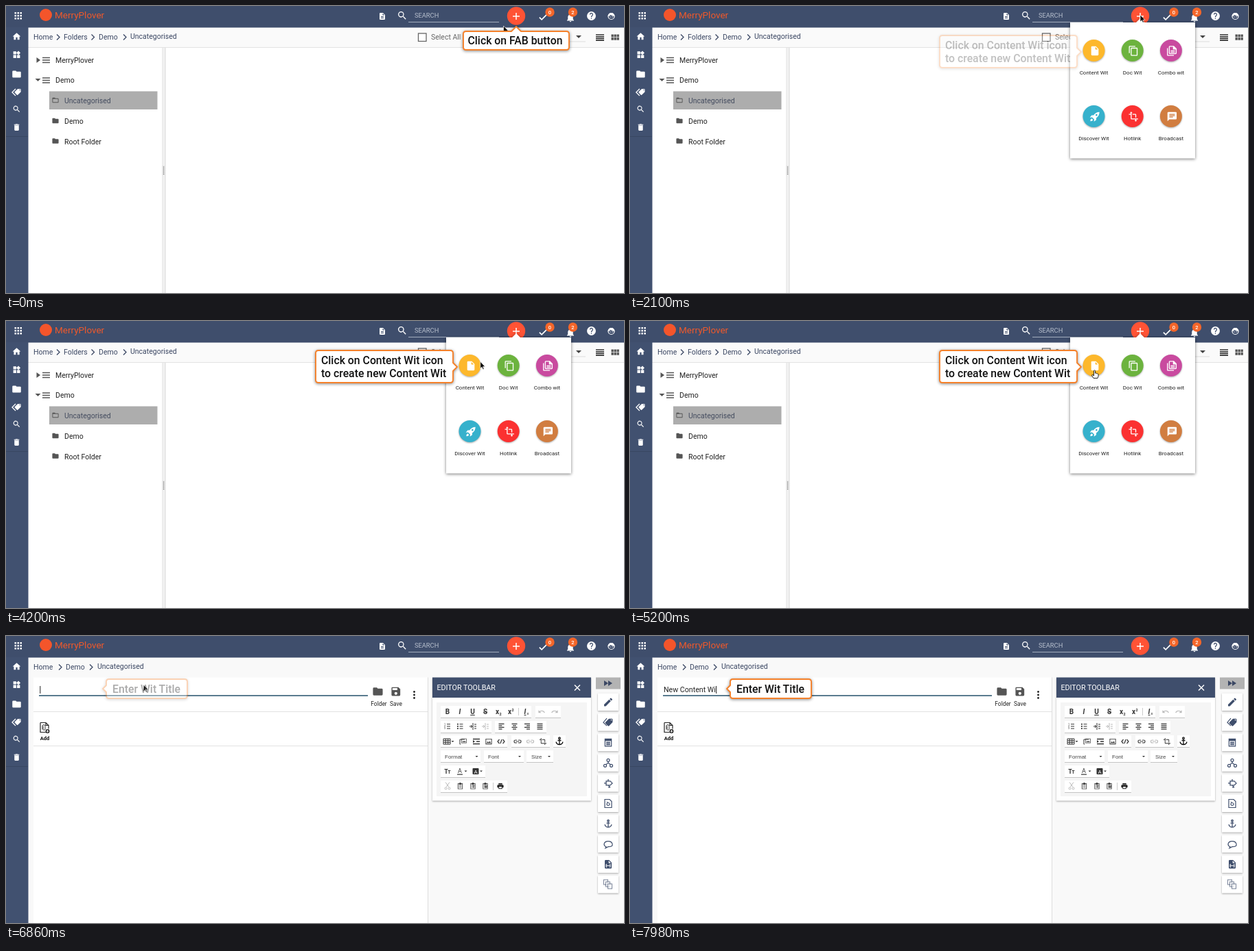
Write an HTML page that moves like this. It is 900 px wide and 419 px high and loops after 8000 ms.

```html
<!DOCTYPE html>
<html lang="en">
<head>
<meta charset="utf-8">
<title>Creating a content item</title>
<style>
html, body { margin: 0; width: 100%; height: 100%; overflow: hidden; background: #fff; }
svg { display: block; width: 100vw; height: 100vh; }
text { font: 10.5px Roboto, sans-serif; white-space: pre; }
.callout text { font-size: 15.8px; font-weight: 500; }
.callout path { fill: #fff; stroke: #f5812a; stroke-width: 1.9; }
.callout { filter: drop-shadow(0 1px 2px #0007); }
#panel { filter: drop-shadow(0 1px 2px #0008); }
.card { filter: drop-shadow(0 1px 1px #0005); }
</style>
</head>
<body>
<svg id="stage" viewBox="0 0 900 419"></svg>
<script>
const NAVY = '#3f4e6c', INK = '#3b4763', GREY = '#666', PALE = '#bbb', DARK = '#333';
const BRAND = 'MerryPlover', TITLE = 'New Content Wit', LOOP = 8000;

// 24-unit icon outlines
const ICON = {
  home: 'M10 20v-6h4v6h5v-8h3L12 3 2 12h3v8z',
  widgets: 'M13 13v8h8v-8zM3 21h8v-8H3zM3 3v8h8V3zM16.7 1.7L11 7.3l5.7 5.7 5.6-5.7z',
  folder: 'M10 4H4Q2 4 2 6V18q0 2 2 2H20q2 0 2-2V8q0-2-2-2H12z',
  folderOpen: 'M10 4H4Q2 4 2 6V18q0 2 2 2H20q2 0 2-2V8q0-2-2-2H12zM4 8H20V18H4z',
  search: 'M15.5 14h-.8l-.3-.3A6.5 6.5 0 1 0 13.7 14.4l.3.3v.8l5 5 1.5-1.5zM9.5 14a4.5 4.5 0 1 1 0-9 4.5 4.5 0 0 1 0 9z',
  trash: 'M6 19q0 2 2 2h8q2 0 2-2V7H6zM19 4h-3.5l-1-1h-5l-1 1H5v2h14z',
  tag: 'M21.4 11.6l-9-9Q12 2 11 2H4Q2 2 2 4v7q0 1 .6 1.4l9 9q1.4 1.2 2.8 0l7-7q1.2-1.4 0-2.8zM5.5 7a1.5 1.5 0 1 1 0-3 1.5 1.5 0 0 1 0 3z',
  page: 'M6 2Q4 2 4 4V20q0 2 2 2H18q2 0 2-2V8L14 2zM13 9V3.5L18.5 9z',
  pageText: 'M6 2Q4 2 4 4V20q0 2 2 2H18q2 0 2-2V8L14 2zM13 9V3.5L18.5 9zM8 12h8v2H8zM8 16h8v2H8z',
  check: 'M9 16.2L4.8 12l-2 2L9 20 21.6 7.4l-2-2z',
  bell: 'M12 22q2 0 2-2h-4q0 2 2 2zM18 16v-5q0-5-4.5-6.3V4a1.5 1.5 0 0 0-3 0v.7Q6 6 6 11v5l-2 2v1h16v-1z',
  help: 'M12 2a10 10 0 1 0 0 20 10 10 0 0 0 0-20zM11 17h2v2h-2zM15 11.3l-.9.9Q13 13.2 13 15h-2q0-2 1.2-3.3l1.2-1.3A2 2 0 1 0 10 9H8a4 4 0 1 1 7 2.3z',
  copy: 'M16 1H4Q2 1 2 3v14h2V3h12zM19 5H8Q6 5 6 7v14q0 2 2 2h11q2 0 2-2V7q0-2-2-2zM19 21H8V7h11z',
  combo: 'M3 6H1v15q0 2 2 2h13v-2H3zM8 1Q5 1 5 3v14q0 2 2 2h13q2 0 2-2V7l-6-6zM7 3h7v6h6v8H7zM9 11h9v1.6H9zM9 14h9v1.6H9z',
  rocket: 'M22 2Q14 2 9 9H5l-4 5 5-.5 4.500 4.500-.5 5 5-4v-4Q22 10 22 2zM15.500 6.500a2 2 0 1 1 0 4 2 2 0 0 1 0-4zM5 16q-3 1-3 6 5 0 6-3z',
  transform: 'M22 18v-2H8V4h2L7 1 4 4h2v2H2v2h4v8q0 2 2 2h8v2h-2l3 3 3-3h-2v-2zM10 8h6v6h2V8q0-2-2-2h-6z',
  crop: 'M17 15h2V7q0-2-2-2H9v2h8zM7 17V1H5v4H1v2h4v10q0 2 2 2h10v4h2v-4h4v-2z',
  chat: 'M20 2H4Q2 2 2 4V22l4-4H20q2 0 2-2V4q0-2-2-2zM6 6h12v2H6zM6 9h12v2H6zM6 12h8v2H6z',
  save: 'M17 3H5Q3 3 3 5v14q0 2 2 2h14q2 0 2-2V7zM12 19a3 3 0 1 1 0-6 3 3 0 0 1 0 6zM15 9H5V5h10z',
  edit: 'M3 17.200V21h3.800L17.800 9.900 14 6.200zM20.700 7q.8-.7 0-1.400l-2.300-2.300q-.7-.7-1.400 0l-1.900 1.800 3.800 3.800z',
  undo: 'M12.500 8Q8.500 8 5.600 10.600L2 7v9h9l-3.600-3.600q2-1.900 5.100-1.900 5.500 0 7.600 5.500l2.400-.8Q20 8 12.500 8z',
  print: 'M19 8H5q-3 0-3 3v6h4v4h12v-4h4v-6q0-3-3-3zM16 19H8v-5h8zM18 3H6v4h12z',
  image: 'M2 3h20v18H2zM4 5v14h16V5zM5 17l4-5 3 3 3-4 4 6z',
  paste: 'M4 3h4q4-4 8 0h4v19H4zM6 5v15h12V5h-2v3H8V5zM8 11h8v1.800H8zM8 15h8v1.800H8z',
  form: 'M3 2h18v20H3zM5 8v12h14V8zM7 10h10v2H7zM7 13h10v2H7zM7 16h10v2H7z'
};

const icon = (name, x, y, size, fill = '#fff', turn = '') =>
  `<path d="${ICON[name]}" fill="${fill}" fill-rule="evenodd" transform="translate(${x} ${y}) ${turn} scale(${size / 24}) translate(-12 -12)"/>`;
const stroke = (d, x, y, color = DARK, width = 1) =>
  `<path d="${d}" fill="none" stroke="${color}" stroke-width="${width}" transform="translate(${x} ${y})"/>`;
const shape = (d, fill, x = 0, y = 0) => `<path d="${d}" fill="${fill}" transform="translate(${x} ${y})"/>`;
const rect = (x, y, w, h, fill, more = '') => `<rect x="${x}" y="${y}" width="${w}" height="${h}" fill="${fill}" ${more}/>`;
const circle = (x, y, r, fill, more = '') => `<circle cx="${x}" cy="${y}" r="${r}" fill="${fill}" ${more}/>`;
const text = (s, x, y, fill = '#222', style = '') => `<text x="${x}" y="${y}" fill="${fill}" style="${style}">${s}</text>`;
const label = (s, x, y, size, fill = '#222', style = '') => text(s, x, y, fill, `font-size:${size}px;text-anchor:middle;${style}`);
const group = (id, body, cls = '') => `<g id="${id}" class="${cls}">${body}</g>`;
const repeat = (list, draw) => list.map(draw).join('');
const chevrons = xs => repeat(xs, x => stroke('M-2-4L2 0-2 4', x, 45.5, INK, 1.3));
const caret = (x, y, fill = DARK, s = 2) => shape(`M${-s} ${-s / 2}H${s}L0 ${s / 2}z`, fill, x, y);
const ANCHOR = 'M0-3V5M-2.500-1H2.500M-5 1Q-4 5 0 5 4 5 5 1M-1.300-4.300a1.300 1.300 0 1 0 2.600 0 1.300 1.300 0 1 0-2.600 0';

function header() {
  const badge = (n, x) => circle(x, 9, 6.7, '#f4662a') + label(n, x, 11.7, 7.5, '#fff', 'font-weight:500');
  return rect(0, 0, 900, 31.500, NAVY) + rect(0, 31, 32.500, 388, '#415170') + rect(0, 190, 32, 1, '#384762') +
    repeat([0, 1, 2, 3, 4, 5, 6, 7, 8], i => rect(12.500 + i % 3 * 4, 9 + (i / 3 | 0) * 4, 2.500, 2.500, '#fff')) +
    circle(58, 13, 9, '#f4552b') + text(BRAND, 71, 17.500, '#f0592b', 'font-size:13.5px') +
    icon('pageText', 548, 15, 12) + icon('search', 577, 14, 16) +
    text('SEARCH', 595, 16.500, '#b9c1cf', 'font-size:9.3px') + rect(586, 23, 132, 1, '#a3adbe') +
    circle(743, 14.500, 13.200, '#ff5335') + stroke('M-5 0H5M0-5V5', 743, 15, '#fff', 1.500) +
    icon('check', 782, 16, 15) + badge(0, 792) + icon('bell', 822, 17, 15) + badge(2, 825.500) +
    icon('help', 852.500, 14.500, 15.500) +
    circle(881.500, 15, 4.500, 'none', 'stroke="#fff" stroke-width="1.2"') +
    shape('M-5 0Q-4-5 0-5T5 0Q1 0-1-2-2 0-5 0z', '#fff', 881.500, 15) +
    circle(880, 16, .7, '#fff') + circle(883, 16, .7, '#fff') +
    icon('home', 15.500, 44.500, 14) + icon('widgets', 15.500, 71, 13) + icon('folder', 15.500, 99.500, 15) +
    icon('tag', 17, 125.500, 11, '#fff', 'rotate(90)') + stroke('M-1-5L-6 0-1 5', 15, 126, '#fff', 1.300) +
    icon('search', 15.500, 150.500, 13) + icon('trash', 15.500, 177, 13);
}

function browser() {
  const menu = y => stroke('M-5.500-3.500H5.500M-5.500 0H5.500M-5.500 3.500H5.500', 58.500, y, '#555', 1.600);
  return rect(32, 31, 868, 388, '#fff') + rect(32, 31, 868, 30, '#fafafa') + rect(32, 60, 868, 1, '#e2e2e2') +
    text('Home', 40, 48.800, INK) + text('Folders', 84, 48.800, INK) + text('Demo', 135, 48.800, INK) +
    text('Uncategorised', 181, 48, INK) + chevrons([76, 126.500, 173]) +
    rect(600.500, 40, 11.500, 11.500, '#fff', 'stroke="#666" stroke-width="1.3"') +
    text('Select All', 619, 49, GREY) + text('Modified Date', 671, 48, GREY) + caret(749.500, 45, '#555', 4) +
    stroke('M-6-3H6M-6 0H2M-6 3H-2', 778, 46, '#777', 1.400) + text('All', 800, 48, GREY) +
    caret(834, 45, '#444', 4) + rect(796, 51.500, 48, 1, '#ddd') +
    stroke('M-6-4H6M-6-1.300H6M-6 1.400H6M-6 4.100H6', 865, 46, DARK, 1.600) +
    repeat([0, 1, 2, 3, 4, 5], i => rect(881.500 + i % 3 * 4, 41.500 + (i / 3 | 0) * 4.500, 3.300, 3.800, '#555')) +
    rect(228, 61, 4, 358, '#f3f3f3') + rect(227.500, 61, .8, 358, '#ddd') + rect(231.500, 61, 1, 358, '#d8d8d8') +
    rect(227.500, 233, 4, 14, '#e4e4e4') +
    repeat([0, 1, 2, 3, 4, 5], i => rect(229, 234.500 + i * 2.100, 1.200, 1, '#777')) +
    shape('M-2.500-4L3 0-2.500 4z', '#555', 47, 79) + menu(79) + text(BRAND, 72, 82.500) +
    caret(46.500, 108, '#555', 4) + menu(108.500) + text('Demo', 72, 112) +
    rect(63, 124.500, 157.500, 26.500, '#adadad') + icon('folderOpen', 72, 137.500, 11, '#555') +
    text('Uncategorised', 85, 141.800, '#444c5f') +
    icon('folder', 72, 167.500, 11, '#555') + text('Demo', 85, 171.800) +
    icon('folder', 72, 197, 11, '#555') + text('Root Folder', 85, 201.500) +
    group('tooltip', rect(728, 32.500, 30, 12, '#555b66', 'rx="2"'));
}

function toolbar() {
  const rows = {
    102: [[633, 132], [771, 37]], 124: [[633, 74], [712, 75]], 145: [[633, 97], [736, 56], [797, 18]],
    167: [[633, 58], [696, 58], [758, 39]], 189: [[633, 65]], 211: [[633, 97]]
  };
  const boxes = repeat(Object.entries(rows), ([y, list]) => repeat(list, ([x, w]) =>
    rect(x, y, w, 17, '#fff') + rect(x, +y + 17, w, 1, '#c4c4c4')));
  const glyph = (s, x, style) => label(s, x, 114, 10, DARK, 'font-weight:700;' + style);
  const lines = (x, y, widths, from = -4.500) => stroke(repeat(widths, (w, i) => `M${from || -w / 2} ${i * 2.500 - 3.700}h${w}`), x, y, DARK, 1.200);
  const select = (s, x, end) => text(s, x, 178.500, '#444', "font:8px 'Liberation Sans',sans-serif") + caret(end, 176);
  const indent = (x, color) => stroke('M0-5V5M2-3H5M2 0H5M2 3H5M-5 0H-1M-3-2L-1 0-3 2', x, 132, color);
  const paste = (x, s) => icon('paste', x, 219, 11, '#444') + label(s, x + 1, 222, 5, DARK, 'font-weight:700');
  return `<g class="card">${rect(621, 60.500, 231, 180, '#fff')}</g>` + rect(621, 60.500, 231, 29.500, NAVY) +
    text('EDITOR TOOLBAR', 627.500, 79, '#fff', 'font-size:10.7px') + stroke('M-4-4L4 4M4-4L-4 4', 832, 75.500, '#fff', 1.500) +
    rect(627, 97, 219, 137, '#f5f5f5') + boxes +
    glyph('B', 643) + glyph('I', 661, 'font-style:italic') + glyph('U', 679.500, 'text-decoration:underline') +
    glyph('S', 698, 'text-decoration:line-through') + glyph('x', 715.500) + label('2', 720, 115.500, 5.500, DARK, 'font-weight:700') +
    glyph('x', 733.500) + label('2', 738, 109.500, 5.500, DARK, 'font-weight:700') + rect(746, 105, 1, 11, '#ccc') +
    glyph('I', 756, 'font-style:italic;text-decoration:underline') + label('x', 760, 115, 6, DARK) +
    icon('undo', 780, 110.500, 11, PALE) + icon('undo', 799, 110.500, 11, PALE, 'scale(-1 1)') +
    repeat([1, 2, 3], i => text(i, 638, 126.800 + i * 3.200, DARK, 'font-size:3.8px') +
      rect(642, 125 + i * 3.200, 5, 1, DARK) + rect(657, 124.600 + i * 3.200, 1.800, 1.800, DARK) + rect(660.500, 125 + i * 3.200, 5, 1, DARK)) +
    indent(680, DARK) + indent(698, PALE) +
    lines(722, 132, [8, 5, 8, 5]) + lines(740.500, 132, [8, 5, 8, 5], 0) +
    stroke('M-4-3.700H4M-1-1.200H4M-4 1.300H4M-1 3.800H4', 759, 132, DARK, 1.200) + lines(778, 132, [8, 8, 8, 8]) +
    stroke('M-5-4H5V4H-5zM-5-1.300H5M-5 1.300H5M-1.700-4V4M1.700-4V4', 642, 154) + caret(650.500, 154) +
    icon('image', 667, 153, 9, '#444') + stroke('M-4 4H-5V-3H2', 666, 154) +
    stroke('M-5-3.500H5M0 0H5M-5 3.500H5', 685, 154, DARK, 1.300) + shape('M-5-2L-2 0-5 2z', DARK, 685, 154) +
    icon('image', 703, 154, 11, DARK) + stroke('M-2.500-3L-5 0-2.500 3M2.500-3L5 0 2.500 3M1-3L-1 3', 721, 154, DARK, 1.200) +
    repeat([[745, '#444'], [763.500, PALE]], ([x, c]) => stroke('M-1-2H-3Q-5-2-5 0T-3 2H-1M1-2H3Q5-2 5 0T3 2H1M-2.500 0H2.500', x, 154, c, 1.200)) +
    icon('crop', 782, 154, 11, DARK) + stroke(ANCHOR, 806, 153.500, '#111', 1.300) +
    select('Format', 639, 685.500) + select('Font', 702, 748) + select('Size', 765, 791) +
    label('T', 641, 201, 9, DARK, 'font-weight:700') + label('T', 645.500, 201, 7, DARK, 'font-weight:700') +
    label('A', 661, 200, 9, DARK) + rect(657, 201.500, 8, 1.200, DARK) + caret(669.500, 197.500) +
    rect(679.500, 193, 9, 9, DARK, 'rx="1"') + label('A', 684, 200.500, 8, '#fff') + caret(692, 197.500) +
    stroke('M-3-5L2 2M3-5L-2 2M-4 4a1.500 1.500 0 1 0 3 0 1.500 1.500 0 1 0-3 0M1 4a1.500 1.500 0 1 0 3 0 1.500 1.500 0 1 0-3 0', 643, 218.500, PALE) +
    paste(661.500, '') + paste(680, 'T') + paste(698, 'W') + rect(709, 214, 1, 11, '#ccc') + icon('print', 720, 219, 11, '#222');
}

function sideTools() {
  const draw = [
    y => icon('edit', 877, y, 16, NAVY),
    y => icon('tag', 878, y, 13, NAVY, 'rotate(90)') + stroke('M-1-6L-6 0-1 5', 876, y, NAVY, 1.200),
    y => icon('form', 877, y, 14, NAVY),
    y => stroke('M0-2V0L-4 3M0 0L4 3', 877, y, NAVY, 1.200) + repeat([[0, -4], [-4.500, 4], [4.500, 4]], ([dx, dy]) =>
      circle(877 + dx, y + dy, 2, '#fff', `stroke="${NAVY}" stroke-width="1.2"`)),
    y => stroke('M-6 0H-3M-3-3H3L6 0 3 3H-3zM0-3V-6M0 3L3 6M3 6H0', 877, y, NAVY, 1.300),
    y => stroke('M-5-6H2L5-3V6H-5zM-2 1a2 2 0 1 0 4 0 2 2 0 1 0-4 0M-2-2L0-1', 877, y, NAVY, 1.200),
    y => stroke(ANCHOR, 877, y, NAVY, 1.300),
    y => stroke('M-3 4Q-6 3-6 0-5-4 0-4T6 0 0 4L-4 6z', 877, y, NAVY, 1.200),
    y => icon('page', 877, y, 15, NAVY) + stroke('M-3 2H3M-2 0H-3V4H-2M2 0H3V4H2', 877, y, '#fff'),
    y => repeat([-3, 0, 3], d => `<g opacity=".7">${rect(873.500 + d, y - 4 + d, 6, 7, '#fff', `stroke="${NAVY}"`)}</g>`)
  ];
  return rect(859, 60.500, 36, 17, '#b3b3b3') + shape('M-6-4L0 0-6 4zM0-4L6 0 0 4z', INK, 877, 69) +
    repeat(draw, (f, i) => {
      const y = 96.500 + i * 29.600;
      return `<g class="card">${rect(862, y - 13, 30, 25.500, '#fff')}</g>` + f(y);
    });
}

function editor() {
  return rect(32, 31, 868, 388, '#f9f9f9') +
    text('Home', 40, 48.800, INK) + text('Demo', 87, 48.800, INK) + text('Uncategorised', 133, 48, INK) + chevrons([79, 124]) +
    rect(40, 60.500, 574, 359, '#fff') + rect(614, 60.500, 1, 359, '#ddd') +
    rect(40, 110, 574, 1, '#e2e2e2') + rect(40, 160, 574, 1, '#e2e2e2') +
    '<text id="title" x="49" y="82.300" fill="#222" style="font-size:10.65px"></text>' +
    rect(49, 73, 1, 11, '#222', 'id="caret"') + rect(48, 86.300, 479, 1.500, '#24506a') +
    icon('folder', 541.500, 81, 17, '#555') + icon('save', 567.800, 81, 17, '#555') +
    label('Folder', 543, 101.500, 8.400) + label('Save', 568, 101.500, 8.400) +
    repeat([81.500, 86, 90.500], y => circle(594.500, y, 1.400, '#222')) +
    stroke('M-6-7H2L6-3V2M-6-7V7H2M2-7V-3H6', 56, 133.500, '#222', 1.200) +
    stroke('M-2-2V3Q-1 5 1 3V-3Q-1-5-3-3V3', 56, 133.500, '#222', .9) +
    circle(60.500, 139, 3, '#222') + stroke('M-2 0H2M0-2V2', 60.500, 139, '#fff', .9) +
    label('Add', 56.500, 152, 7.500, '#111', 'font-weight:700') + toolbar() + sideTools();
}

function panel() {
  const items = [
    ['Content Wit', '#fdb82c', 'page'], ['Doc Wit', '#6cb33e', 'copy'], ['Combo wit', '#c94a9f', 'combo'],
    ['Discover Wit', '#36b1cc', 'rocket'], ['Hotlink', '#fb3131', 'transform'], ['Broadcast', '#d17d40', 'chat']
  ];
  return shape('M641 24H737l6-6 6 6H823V222.500H641z', '#fff') + repeat(items, ([name, color, glyph], i) => {
    const x = 675.500 + i % 3 * 56.200, y = 65 + (i / 3 | 0) * 96;
    return circle(x, y, 16, color, 'class="card"') + icon(glyph, x + 1.500, y + .5, 16) + label(name, x, y + 34.500, 8);
  });
}

const callout = (id, outline, x, y, lines) => group(id, `<path d="${outline}"/>` +
  repeat(lines, (s, i) => text(s, x, y + i * 19, '#111')), 'callout');

document.getElementById('stage').innerHTML =
  group('browser', browser()) + group('editor', editor()) + header() + group('panel', panel()) +
  '<g id="cursor"><path id="arrow" d="M0 0V10L2.300 8 3.800 11.300 5.400 10.600 3.900 7.300H7z" stroke="#fff" stroke-width=".7"/>' +
  '<path id="hand" d="M-1 .5q1-1.300 2 0V4.200q1.300-.6 1.700.4 1.200-.5 1.600.5 1.200-.1 1.200 1V8.500l-1 3H-1.500L-4 7.500q0-1.300 1.500-.8L-1 8z" fill="#fff" stroke="#111" stroke-width=".9"/></g>' +
  callout('tipAdd', 'M670 37H736l7-7 7 7H816q4 0 4 4V60q0 4-4 4H670q-4 0-4-4V41q0-4 4-4z', 672.500, 56, ['Click on FAB button']) +
  callout('tipContent', 'M455 43H647q4 0 4 4V61l6 6-6 6V86q0 4-4 4H455q-4 0-4-4V47q0-4 4-4z', 459, 62.700,
    ['Click on Content Wit icon', 'to create new Content Wit']) +
  callout('tipTitle', 'M150 63H260q4 0 4 4V87q0 4-4 4H150q-4 0-4-4V82l-5-5 5-5V67q0-4 4-4z', 155, 82.500, ['Enter Wit Title']);

const el = id => document.getElementById(id);
const ramp = (t, start, length) => Math.min(1, Math.max(0, (t - start) / length));
const ease = p => p * p * (3 - 2 * p);
const show = (id, on) => el(id).style.display = on ? '' : 'none';
const fade = (id, opacity) => { show(id, opacity > 0); el(id).style.opacity = opacity; };

// Cursor legs: start time, duration, destination
const LEGS = [[0, 500, 743, 13], [3500, 1000, 676.500, 72], [6680, 160, 200, 71]];
function cursorAt(t) {
  return LEGS.reduce(([x, y], [start, length, toX, toY]) => {
    const p = ease(ramp(t, start, length));
    return [x + (toX - x) * p, y + (toY - y) * p];
  }, [724.500, 29]);
}

function render(t) {
  const inEditor = t >= 6680;
  show('browser', !inEditor);
  show('editor', inEditor);
  fade('panel', ramp(t, 1780, 160) * (1 - ramp(t, 6490, 140)));
  fade('tipAdd', 1 - ramp(t, 1700, 100));
  fade('tipContent', ramp(t, 2050, 200) * (1 - ramp(t, 6300, 180)));
  fade('tipTitle', ramp(t, 6840, 60));

  const [x, y] = cursorAt(t);
  const onAdd = t < 1800 && Math.hypot(x - 743, y - 14.500) < 13;
  const onContent = t > 3500 && t < 6480 && Math.hypot(x - 675.500, y - 65) < 16;
  el('cursor').setAttribute('transform', `translate(${x} ${y})`);
  show('hand', onAdd || onContent);
  show('arrow', !onAdd && !onContent);
  show('cursor', t < 6900);
  show('tooltip', onAdd && t > 700);

  const typed = Math.floor(Math.max(0, t - 6960) / 71.500);
  el('title').textContent = TITLE.slice(0, typed);
  if (inEditor) el('caret').setAttribute('x', 49.300 + el('title').getComputedTextLength());
}

function tick() {
  render(performance.now() % LOOP);
  requestAnimationFrame(tick);
}
tick();
</script>
</body>
</html>
```
